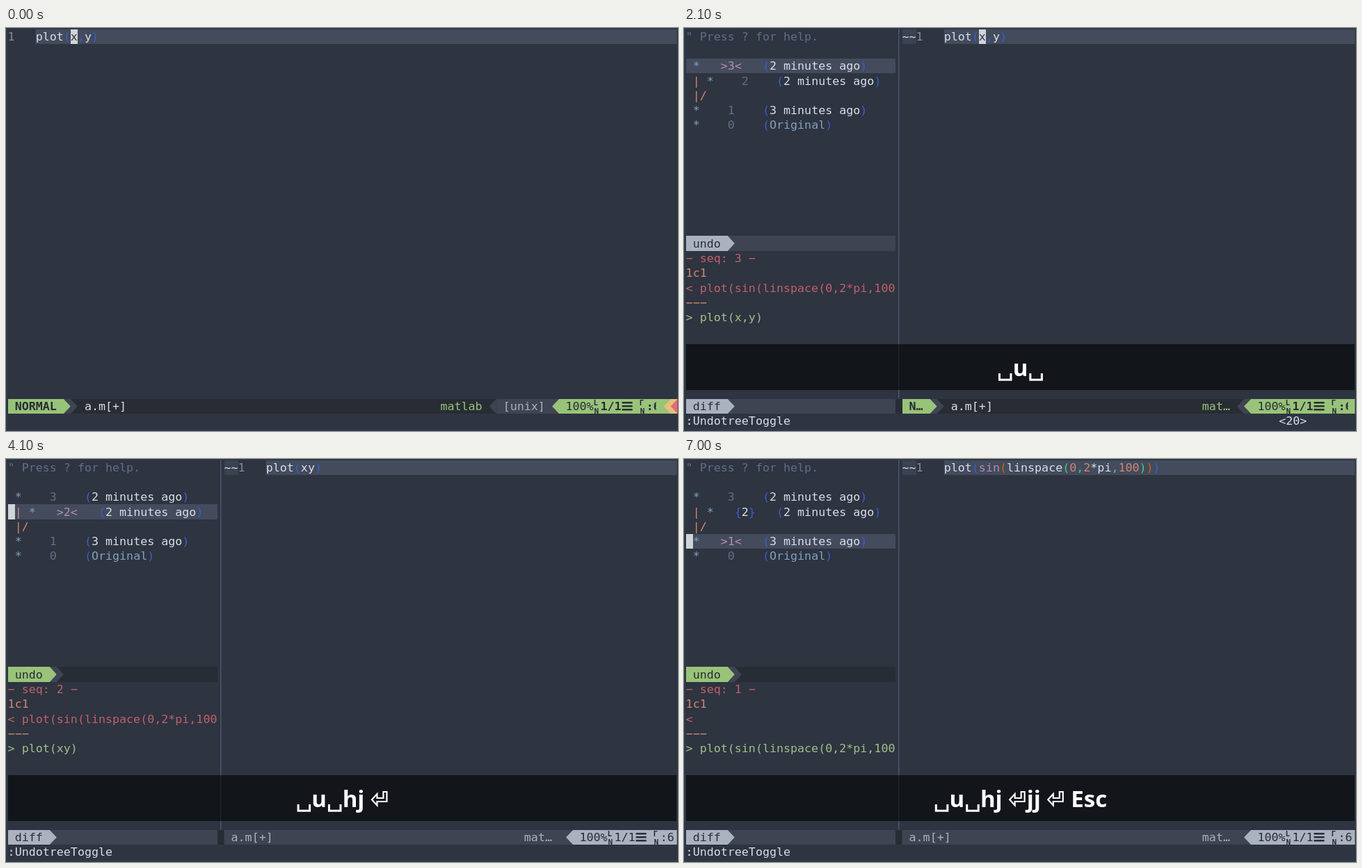
Recreate the animation shown at these times as an HTML page with a canvas. Size 966 by 580 pixels, loop 8.2 s.

```html
<!DOCTYPE html>
<html>
<head>
<meta charset="utf-8">
<style>
  html, body { margin: 0; width: 100%; height: 100%; overflow: hidden; background: #2e3440; }
  canvas { display: block; }
</style>
</head>
<body>
<canvas id="stage" width="966" height="580"></canvas>
<script>
const ctx = document.getElementById('stage').getContext('2d');
const LOOP = 8200, CELL = 10.03, LINE = 21.28, LEFT = 2.6, TOP = 1.5, RIGHT = 964.5;
const MONO = '"DejaVu Sans Mono", monospace';
const C = {
  bg: '#2e3440', edge: '#2d3a49', line: '#434b5d', fg: '#d8dee9', dim: '#616e88', number: '#858c99',
  blue: '#81a1c1', purple: '#b48ead', orange: '#d08770', red: '#bf616a', leaf: '#a3be8c',
  green: '#98c379', gray: '#abb2bf', mid: '#3e4452', dark: '#282c34', split: '#4c566a',
  cursor: '#d0d3d8', yellow: '#e5c07b', rose: '#e06c75'
};
const NEST = ['#3a5fcd', '#cd6600', '#43cd80'];

// Typed keys: time, glyph, end of the underline (if any)
const KEYS = [
  [900, '␣'], [1100, 'u'], [2100, '␣'], [2300, 'h', 2500], [3200, 'j', 3400],
  [3900, '⏎', 4100], [4700, 'j', 4900], [4900, 'j', 5100], [5400, '⏎', 5600], [6900, ' Esc', 7000]
];

const colX = col => LEFT + col * CELL;
const rowY = row => TOP + row * LINE;

function rect(x, y, w, h, color) {
  ctx.fillStyle = color;
  ctx.fillRect(x, y, w, h);
}

function textAt(x, row, str, color, bold) {
  ctx.font = `${bold ? 'bold ' : ''}16.66px ${MONO}`;
  ctx.fillStyle = color;
  ctx.fillText(str, x, rowY(row) + 16.3);
}

const text = (col, row, str, color, bold) => textAt(colX(col), row, str, color, bold);

function fillRow(row, x1, x2, color) {
  const y = Math.round(rowY(row));
  rect(x1, y, x2 - x1, Math.round(rowY(row + 1)) - y, color);
}

const cells = (row, from, to, color) => fillRow(row, Math.round(colX(from)), Math.round(colX(to)), color);

// Powerline triangle one cell wide
function arrow(col, row, dir, color, behind) {
  cells(row, col, col + 1, behind);
  const tip = colX(dir > 0 ? col + 1 : col), base = colX(dir > 0 ? col : col + 1);
  const y1 = Math.round(rowY(row)), y2 = Math.round(rowY(row + 1));
  ctx.fillStyle = color;
  ctx.beginPath();
  ctx.moveTo(base, y1);
  ctx.lineTo(tip, (y1 + y2) / 2);
  ctx.lineTo(base, y2);
  ctx.fill();
}

// Code with brackets and commas coloured by nesting depth
function code(col, row, str) {
  let depth = -1;
  for (const part of str.match(/[a-z]+|\d+|./g)) {
    let color = C.fg;
    if (part === '(') depth++;
    if ('(),'.includes(part)) color = NEST[depth];
    else if (/\d/.test(part)) color = C.orange;
    else if (part === 'sin') color = C.purple;
    text(col, row, part, color);
    if (part === ')') depth--;
    col += part.length;
  }
}

function cursor(col, row, char = '') {
  cells(row, col, col + 1, C.cursor);
  text(col, row, char, C.bg);
}

function smallPair(x, top, bottom) {
  ctx.fillStyle = C.dark;
  ctx.font = `bold 11px ${MONO}`;
  ctx.fillText(top, x, 543);
  ctx.fillText(bottom, x + 1, 555);
}

function position(x, bold, clip) {
  textAt(x, 25, '100%', C.dark);
  smallPair(x + 40, 'L', 'N');
  textAt(x + 50, 25, '1/1', C.dark, bold);
  for (let i = 0; i < 3; i++) rect(x + 81, 538 + i * 5, 15, 2.5, C.dark);
  smallPair(x + 106, 'Γ', 'N');
  textAt(x + 116, 25, ':', C.dark, bold);
  ctx.save();
  ctx.beginPath();
  ctx.rect(x, 530, clip, 30);
  ctx.clip();
  textAt(x + 126, 25, '6', C.dark, bold);
  ctx.restore();
}

function singleWindow() {
  text(0, 0, '1', C.number);
  fillRow(0, colX(4), RIGHT, C.line);
  code(4, 0, 'plot(x,y)');
  cursor(9, 0, 'x');

  fillRow(25, LEFT, RIGHT, C.dark);
  cells(25, 0, 8, C.green);
  text(1, 25, 'NORMAL', C.dark, true);
  arrow(8, 25, 1, C.green, C.mid);
  arrow(9, 25, 1, C.mid, C.dark);
  text(11, 25, 'a.m[+]', C.fg);
  text(62, 25, 'matlab', C.green);
  arrow(69, 25, -1, C.mid, C.dark);
  cells(25, 70, 78, C.mid);
  text(71, 25, '[unix]', C.gray);
  arrow(78, 25, -1, C.green, C.mid);
  cells(25, 79, 94, C.green);
  position(804.5, true, 130);
  arrow(94, 25, -1, C.yellow, C.green);
  arrow(95, 25, -1, C.rose, C.yellow);
}

function panelStatus(row, name, active) {
  const main = active ? C.green : C.gray;
  cells(row, 0, 30, active ? C.dark : C.mid);
  cells(row, 0, 6, main);
  text(1, row, name, C.dark);
  arrow(6, row, 1, main, C.mid);
  if (active) arrow(7, row, 1, C.mid, C.dark);
}

function treeEntry(row, indent, seq, current, previous, age) {
  text(1 + indent, row, '*', C.blue);
  const col = 5 + indent + (indent ? 0 : 0);
  if (seq === current) {
    text(col, row, `>${seq}<`, C.purple);
  } else if (seq === previous) {
    text(col, row, '{ }', NEST[0]);
    text(col + 1, row, `${seq}`, C.fg);
  } else {
    text(col + 1, row, `${seq}`, C.dim);
  }
  text(11 + indent, row, '(', NEST[0]);
  text(12 + indent, row, age, age === 'Original' ? C.blue : C.fg);
  text(12 + indent + age.length, row, ')', NEST[0]);
}

function treePanel(t, current, source, inTree) {
  const full = 'plot(sin(linspace(0,2*pi,100';
  const row = t < 3100 ? 2 : t < 4700 ? 3 : t < 4900 ? 4 : 5;
  cells(row, 0, 30, C.line);
  text(0, 0, '" Press ? for help.', C.dim);
  const previous = current === 1 ? 2 : -1;
  treeEntry(2, 0, 3, current, previous, '2 minutes ago');
  text(1, 3, '|', C.orange);
  treeEntry(3, 2, 2, current, previous, '2 minutes ago');
  text(1, 4, '|/', C.orange);
  treeEntry(5, 0, 1, current, previous, '3 minutes ago');
  treeEntry(6, 0, 0, current, previous, 'Original');
  if (inTree) cursor(0, row);

  panelStatus(14, 'undo', inTree);
  text(0, 15, `− seq: ${current} −`, C.red);
  text(0, 16, '1c1', C.orange);
  text(0, 17, current === 1 ? '<' : '< ' + full, C.red);
  text(0, 18, '−−−', C.orange);
  text(0, 19, '> ' + (current === 1 ? full : source), C.leaf);
  panelStatus(25, 'diff', false);
}

function codePanel(source, active) {
  rect(308, TOP, 1.5, rowY(25) - TOP, C.split);
  cells(0, 31, 33, '#3b4252');
  text(31, 0, '~~', C.fg);
  text(33, 0, '1', C.number);
  fillRow(0, colX(37), RIGHT, C.line);
  code(37, 0, source);

  cells(25, 30, 31, C.dark);
  fillRow(25, colX(31), RIGHT, active ? C.dark : C.mid);
  if (active) {
    cursor(42, 0, 'x');
    cells(25, 31, 35, C.green);
    text(32, 25, 'N…', C.dark, true);
    arrow(35, 25, 1, C.green, C.mid);
    arrow(36, 25, 1, C.mid, C.dark);
    arrow(79, 25, -1, C.mid, C.dark);
  }
  text(active ? 38 : 32, 25, 'a.m[+]', active ? C.fg : C.gray);
  text(74, 25, 'mat…', active ? C.green : C.gray);
  const main = active ? C.green : C.gray;
  arrow(80, 25, -1, main, C.mid);
  fillRow(25, Math.round(colX(81)), RIGHT, main);
  position(824.5, active, active ? 130 : 140);
}

function stroke(x, y, points, width, closed) {
  ctx.beginPath();
  points.forEach(([px, py]) => ctx.lineTo(x + px, y + py));
  if (closed) ctx.closePath();
  ctx.strokeStyle = '#fff';
  ctx.lineWidth = width;
  ctx.stroke();
}

const RETURN = [[23, 1], [18, 1], [18, 10], [9, 10], [9, 4], [1.5, 12.3], [9, 20.5], [9, 15], [23, 15]];

function keyOverlay(t) {
  if (t < 800) return;
  rect(3, 455, 961, 66, `rgba(0,0,0,${t < 900 ? 0.4 : 0.6})`);
  if (t < 900) {
    const gray = '#b4b6b9';
    rect(475, 496, 3.5, 11, gray);
    rect(489, 496, 3.5, 11, gray);
    rect(472, 499.5, 23, 2, gray);
    rect(475, 503, 17.5, 4, gray);
    return;
  }
  ctx.font = 'bold 33px "Noto Sans", "Open Sans", sans-serif';
  const widthOf = glyph => glyph === '␣' ? 22.7 : glyph === '⏎' ? 35 : ctx.measureText(glyph).width;
  const typed = KEYS.filter(([start]) => t >= start);
  let x = 483.5 - typed.reduce((sum, [, glyph]) => sum + widthOf(glyph), 0) / 2;
  for (const [, glyph, lineEnd] of typed) {
    const width = widthOf(glyph);
    if (glyph === '␣') stroke(x + 2, 497, [[1.5, 0], [1.5, 9.2], [18, 9.2], [18, 0]], 3);
    else if (glyph === '⏎') stroke(x + 9, 478, RETURN, 2.2, true);
    else {
      ctx.fillStyle = '#fff';
      ctx.fillText(glyph, x, 501);
    }
    if (t < lineEnd) rect(x, 504, width, 1.7, '#fff');
    x += width;
  }
}

function draw(t) {
  rect(0, 0, 966, 580, C.edge);
  rect(2, 1.5, 963, 575, C.bg);
  if (t < 1100) {
    singleWindow();
  } else {
    const current = t < 3900 ? 3 : t < 5400 ? 2 : 1;
    const source = ['plot(sin(linspace(0,2*pi,100)))', 'plot(xy)', 'plot(x,y)'][current - 1];
    const inTree = t >= 2300;
    treePanel(t, current, source, inTree);
    codePanel(source, !inTree);
    text(0, 26, ':UndotreeToggle', C.fg);
  }
  if ((t >= 700 && t < 1100) || (t >= 2100 && t < 2300)) text(85, 26, '<20>', C.fg);
  keyOverlay(t);
}

const start = performance.now();
function tick() {
  draw((performance.now() - start) % LOOP);
  requestAnimationFrame(tick);
}
tick();
</script>
</body>
</html>
```
